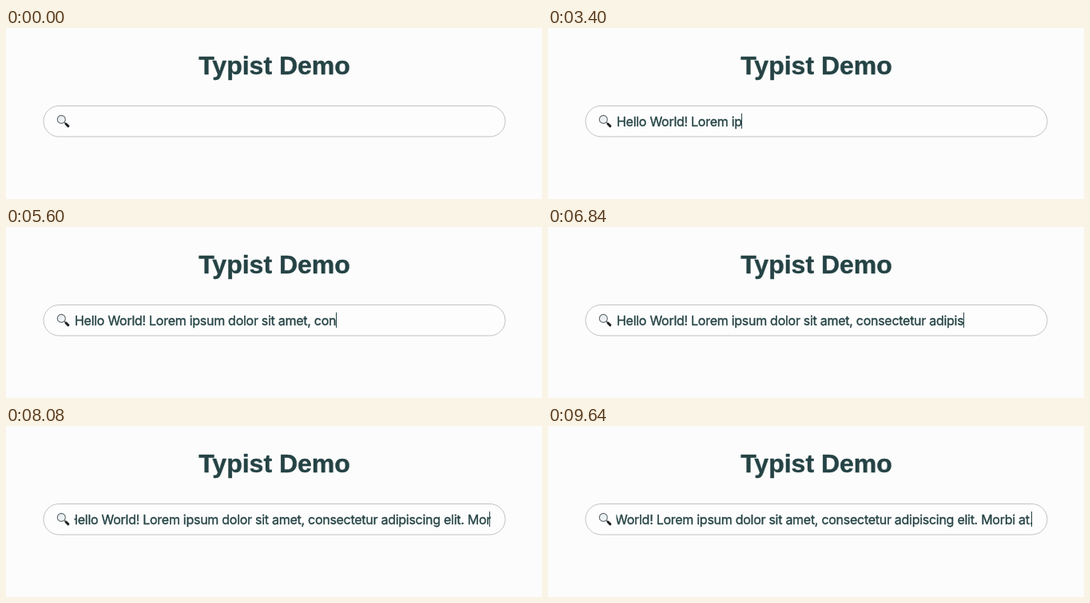
Recreate the animation shown at these times as an HTML page with a canvas. Size 671 by 214 pixels, loop 9.76 s.

```html
<!DOCTYPE html>
<html lang="en">
<head>
<meta charset="utf-8">
<title>Typist Demo</title>
<style>
  html, body { margin: 0; width: 100%; height: 100%; overflow: hidden; background: #fcfcfc; }
  canvas { display: block; width: 671px; height: 214px; }
</style>
</head>
<body>
<canvas id="stage"></canvas>
<script>
const W = 671, H = 214, LOOP = 9760;
const TEXT = 'Hello World! Lorem ipsum dolor sit amet, consectetur adipiscing elit. Morbi at.';
const INK = '#254345';
const FIELD = { left: 86, right: 607, baseline: 122.5, caretMax: 605 };

// Typing rhythm: [time in ms, characters shown]
const RHYTHM = [
  [1600, 1], [1760, 3], [1880, 4], [2600, 12], [3400, 21], [3480, 22], [3600, 23],
  [4680, 34], [5600, 44], [5680, 45], [6640, 57], [6840, 59], [7640, 67], [8080, 73], [8680, 79]
];
// Spans in which the caret shows
const CARET_ON = [[440, 920], [1600, 9120], [9600, LOOP]];

const canvas = document.getElementById('stage');
const ctx = canvas.getContext('2d');
const dpr = window.devicePixelRatio || 1;
canvas.width = W * dpr;
canvas.height = H * dpr;
ctx.scale(dpr, dpr);

function charsAt(t) {
  if (t < RHYTHM[0][0]) return 0;
  for (let i = 1; i < RHYTHM.length; i++) {
    const [t0, n0] = RHYTHM[i - 1], [t1, n1] = RHYTHM[i];
    if (t < t1) return Math.floor(n0 + (n1 - n0) * (t - t0) / (t1 - t0) + 1e-6);
  }
  return TEXT.length;
}

// A thin outline gives the text its slightly heavier, smoothed look
function inkText(text, x, y, weight) {
  ctx.fillStyle = ctx.strokeStyle = INK;
  ctx.lineWidth = weight;
  ctx.lineJoin = 'round';
  ctx.fillText(text, x, y);
  ctx.strokeText(text, x, y);
}

function drawHeading() {
  ctx.font = 'bold 32px "Liberation Sans", Arial, sans-serif';
  ctx.letterSpacing = '0px';
  ctx.textAlign = 'center';
  inkText('Typist Demo', 336, 57.5, 0.4);
}

function drawBox() {
  ctx.beginPath();
  ctx.roundRect(47, 97.5, 578, 38.5, 19.25);
  ctx.fillStyle = '#fdfdfd';
  ctx.fill();
  ctx.lineWidth = 1;
  ctx.strokeStyle = '#c2c2c2';
  ctx.stroke();
}

function line(x0, y0, x1, y1, width, color) {
  ctx.beginPath();
  ctx.moveTo(x0, y0);
  ctx.lineTo(x1, y1);
  ctx.lineWidth = width;
  ctx.strokeStyle = color;
  ctx.stroke();
}

function drawLens() {
  ctx.lineCap = 'round';
  line(72.8, 117.8, 75, 120, 1.6, '#777c80');
  line(75, 120, 77.9, 122.8, 3, '#1d2022');
  ctx.lineCap = 'butt';
  const glass = ctx.createLinearGradient(65, 110, 73, 119);
  glass.addColorStop(0, '#dfe7ea');
  glass.addColorStop(1, '#f7fafb');
  ctx.beginPath();
  ctx.arc(69.3, 114.4, 5, 0, Math.PI * 2);
  ctx.fillStyle = glass;
  ctx.fill();
  ctx.lineWidth = 1.1;
  ctx.strokeStyle = '#62696d';
  ctx.stroke();
}

function drawInput(t) {
  const typed = TEXT.slice(0, charsAt(t));
  ctx.font = '16px Inter, sans-serif';
  ctx.letterSpacing = '-0.275px';
  ctx.textAlign = 'left';
  const width = ctx.measureText(typed).width;
  const x = Math.min(FIELD.left, FIELD.right - width);

  ctx.save();
  ctx.beginPath();
  ctx.rect(85.5, 100, 521.5, 34);
  ctx.clip();
  inkText(typed, x, FIELD.baseline, 0.35);
  if (CARET_ON.some(([a, b]) => t >= a && t < b)) {
    ctx.fillRect(Math.min(Math.floor(x + width), FIELD.caretMax), 107, 1, 19);
  }
  ctx.restore();
}

function draw(t) {
  ctx.fillStyle = '#fcfcfc';
  ctx.fillRect(0, 0, W, H);
  drawHeading();
  drawBox();
  drawLens();
  drawInput(t);
}

const start = performance.now();
function tick() {
  draw((performance.now() - start) % LOOP);
  requestAnimationFrame(tick);
}
tick();
</script>
</body>
</html>
```
